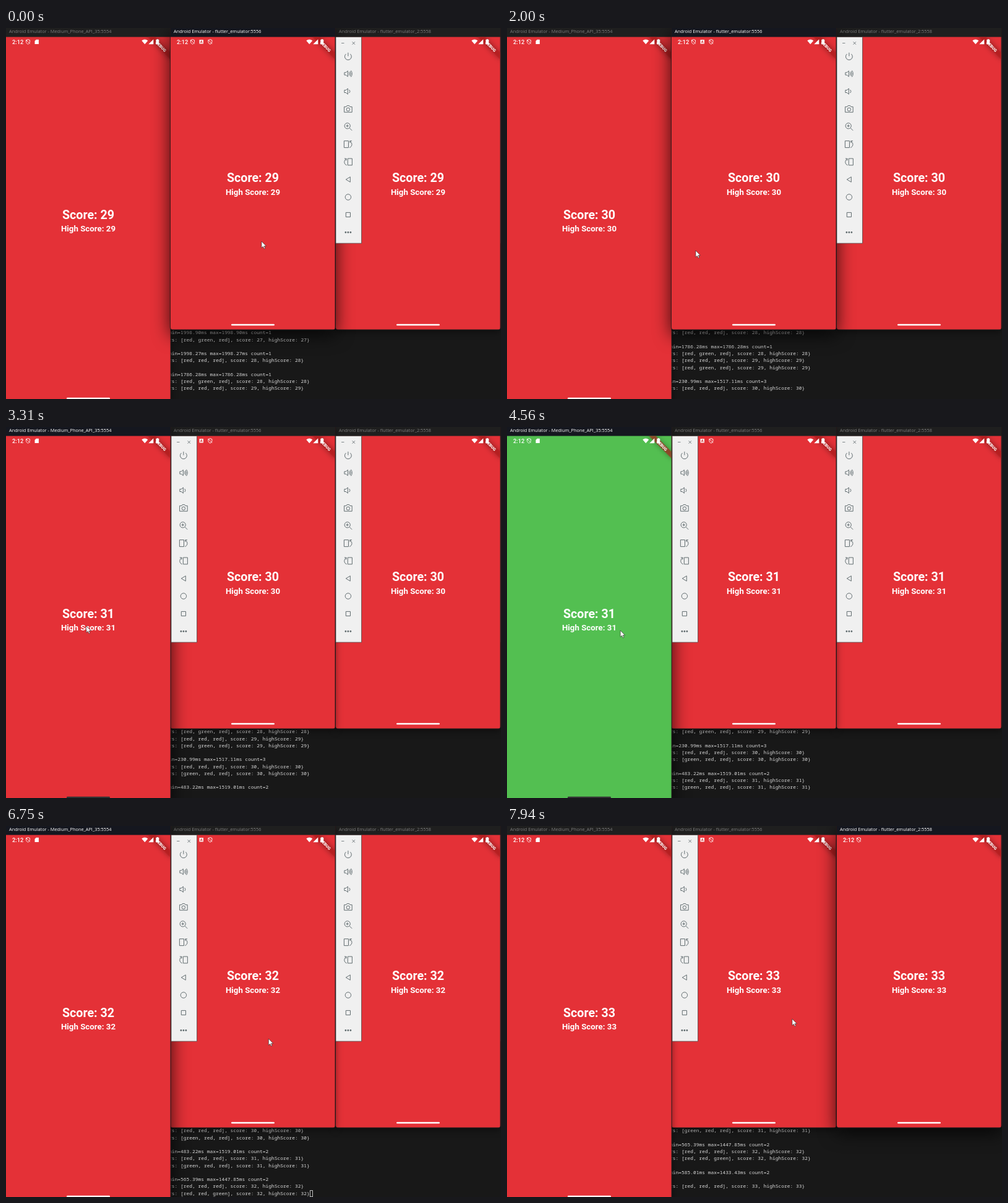
Write an HTML page that moves like this. It is 800 px wide and 600 px high and loops after 8000 ms.

```html
<!DOCTYPE html>
<html>
<head>
<meta charset="utf-8">
<style>
html, body { margin: 0; width: 100%; height: 100%; overflow: hidden; background: #181818; }
#stage { position: absolute; left: 0; top: 0; width: 800px; height: 600px; overflow: hidden; }
#log { position: absolute; left: 263px; top: 487.4px; margin: 0; color: #d8d8d8;
  font: 500 7.92px/11.23px "Noto Sans Mono", "DejaVu Sans Mono", monospace; }
#log i { display: inline-block; box-sizing: border-box; width: 5px; height: 11px; border: 1px solid #bbb; vertical-align: top; }
.win { position: absolute; top: 0; width: 266px; border-radius: 0 0 4px 4px; background: #1f1f1f;
  box-shadow: 0 0 0 .6px #2a1a1c, 0 3px 12px rgba(0,0,0,.5); }
.win.active { background: #15171f; box-shadow: 0 0 0 .6px #2a1a1c, 0 8px 28px 1px rgba(0,0,0,.75); }
.win svg { position: absolute; left: 0; top: 0; overflow: visible; }
.win .body { overflow: hidden; }
.title { font: 7.35px "Open Sans", "Noto Sans", sans-serif; fill: #7c7c7c; }
.active .title { fill: #fff; }
.score { font: bold 19.7px Roboto, sans-serif; text-anchor: middle; fill: #fff; }
.high { font: 600 13.3px Roboto, sans-serif; text-anchor: middle; fill: #fff; }
.clock { font: 500 9.3px Roboto, sans-serif; fill: #fff; }
.debug { font: 900 6.6px Roboto, sans-serif; text-anchor: middle; fill: #fff; }
.ribbon { filter: drop-shadow(0 0 4px rgba(0,0,0,.55)); }
.line { fill: none; stroke: #fff; stroke-width: .9; }
.tools { fill: none; stroke: #626d70; stroke-width: 1; stroke-linejoin: round; }
#mouse { position: absolute; left: 0; top: 0; z-index: 9; overflow: visible; }
</style>
</head>
<body>
<div id="stage">
  <pre id="log"></pre>
  <svg id="mouse" width="10" height="14"><path d="M0 0V10.5L2.5 8.3 4.1 12 5.8 11.3 4.2 7.7H7.5Z" fill="#fff" stroke="#222" stroke-width=".6"/></svg>
</div>
<script>
const LOOP = 8000, LAG = 150;
const RED = '#e43137', GREEN = '#53bf51';
const stage = document.getElementById('stage');
const log = document.getElementById('log');
const mouse = document.getElementById('mouse');

const at = (x, y, inner) => `<g transform="translate(${x} ${y})">${inner}</g>`;
const path = (d, extra = '') => `<path d="${d}" ${extra}/>`;

const shield = path('M0-3.7 3-2.6V0C3 2 1.6 3.1 0 3.8-1.6 3.1-3 2-3 0V-2.6ZM-3.2-3.2 3.2 3.2', 'class="line"');
const card = path('M-1-3.6H3.2V3.8H-3.2V-1.4Z', 'fill="#fff"');
const letterBox = path('M-3.2-3.2H3.2V3.2H-3.2Z', 'fill="#fff"') +
  path('M-1.6 2 0-2 1.6 2M-1 .8H1', 'fill="none" stroke="#c33" stroke-width=".9"');

// Toolbar icons, each centred on its own origin
const speaker = 'M-6-2H-3.6L-.5-4.6V4.6L-3.6 2H-6Z';
const rotate = 'M-6.5-5.4H.6V5.4H-6.5ZM-4.5-3V-2.9M-1.6-3V-2.9M2.2 5.4C7.2 4 7.2-2.6 3-4.9M6-5.4 2.7-5.2 3.3-2';
const tools = [
  [46, path('M-3.4-4A5.4 5.4 0 1 0 3.4-4M0-6.2V-.4')],
  [74, path(speaker + 'M1.6-2.4Q3 0 1.6 2.4M3.2-4Q5.6 0 3.2 4M4.6-5.2Q8.2 0 4.6 5.2')],
  [102.5, path(speaker + 'M1.8-2.6Q4.4 0 1.8 2.6')],
  [131, path('M-6.3-3.6H-3L-1.8-5.4H1.8L3-3.6H6.3V5.2H-6.3Z') + '<circle cy=".7" r="2.7"/>'],
  [159.5, '<circle cx="-1.2" cy="-1.2" r="4.6"/>' + path('M2.2 2.2 6.3 6.3M-3.4-1.2H1M-1.2-3.4V1')],
  [188, path(rotate)],
  [216.5, path(rotate, 'transform="scale(-1 1)"')],
  [245, path('M3.4-4.2V4.2L-3.6 0Z')],
  [273.5, '<circle r="4.7"/>'],
  [302, path('M-3.6-3.6H3.6V3.6H-3.6Z')],
  [330.5, [-4, 0, 4].map(x => `<circle cx="${x}" r="1.4" fill="#626d70" stroke="none"/>`).join('')]
];
const toolbar = `<g class="tools"><path d="M1 14.5H42.6V348.2H1Z" fill="#f0f0f0" stroke="#3a3a3a" stroke-width=".7"/>` +
  at(12.3, 24.5, path('M-2.2 0H2.2', 'stroke-width=".8"')) +
  at(29.8, 24.5, path('M-2.2-2.2 2.2 2.2M2.2-2.2-2.2 2.2', 'stroke-width=".9"')) +
  tools.map(([y, icon]) => at(20.9, y, icon)).join('') + '</g>';

function makeWindow(x, height, title, icons) {
  const el = document.createElement('div');
  const mid = (height - 488) / 2;
  el.className = 'win';
  el.style.cssText = `left:${x}px;height:${height}px`;
  el.innerHTML = `
    <svg class="body" width="266" height="${height}" style="border-radius:0 0 4px 4px">
      <rect class="bg" y="14.5" width="265.6" height="${height - 15}"/>
      <text class="title" x="5" y="7.6">${title}</text>
      <text class="score" x="133" y="${249 + mid}"></text>
      <text class="high" x="133" y="${269.5 + mid}"></text>
      <rect class="bar" x="98" y="${height - 9.2}" width="70" height="2.5" rx="1.2"/>
      <svg y="14.5" width="265.6" height="100" style="overflow:hidden">
        <g transform="translate(266 0) rotate(45)">
          <rect class="ribbon" x="-26" y="18.1" width="52" height="7.7" fill="#b71c1c" fill-opacity=".63"/>
          <text class="debug" y="24.3">DEBUG</text>
        </g>
      </svg>
      <text class="clock" x="10" y="25.7">2:12</text>
      ${icons.map((icon, i) => at(35.5 + i * 14.2, 22.3, icon)).join('')}
      <g fill="#fff">
        ${at(224.3, 22.3, path('M0 4-5-1.8C-2-4.6 2-4.6 5-1.8Z'))}
        ${at(234.3, 22.3, path('M-4 4H4V-4Z'))}
        ${at(244.8, 22.3, path('M-1-4.3H1V-3.6H2.5V4.2H-2.5V-3.6H-1Z'))}
      </g>
    </svg>
    <svg width="42" height="349" style="left:266px">${toolbar}</svg>`;
  stage.append(el);
  const find = s => el.querySelector(s);
  return { el, bg: find('.bg'), bar: find('.bar'), score: find('.score'), high: find('.high') };
}

const wins = [
  makeWindow(0, 607, 'Android Emulator - Medium_Phone_API_35:5554', [shield, card]),
  makeWindow(266, 488, 'Android Emulator - flutter_emulator:5556', [shield, letterBox, shield]),
  makeWindow(533, 488, 'Android Emulator - flutter_emulator_2:5558', [shield])
];

// Rounds: window index, time it turns green, time it is tapped
const rounds = [[1, 380, 1380], [0, 2620, 3200], [0, 4540, 5460], [2, 6800, 7350]];

const colours = { r: 'red', g: 'green' };
const state = (code, n) => `rs: [${[...code].map(c => colours[c]).join(', ')}], score: ${n}, highScore: ${n}}`;
const stat = (min, max, count) => `in=${min}ms max=${max}ms count=${count}`;
const events = [
  [0, 'm' + stat('1998.90', '1998.90', 1), state('rgr', 27), '', 'm' + stat('1998.27', '1998.27', 1),
    state('rrr', 28), '', 'm' + stat('1786.28', '1786.28', 1), state('rgr', 28), state('rrr', 29)],
  [300, state('rgr', 29)],
  [700, '', stat('230.99', '1517.11', 3)],
  [1400, state('rrr', 30)],
  [2560, state('grr', 30)],
  [3000, '', 'm' + stat('483.22', '1519.01', 2)],
  [3380, state('rrr', 31)],
  [4480, state('grr', 31)],
  [4850, '', 'm' + stat('565.39', '1447.85', 2)],
  [5480, state('rrr', 32)],
  [6720, state('rrg', 32)],
  [7100, '', 'm' + stat('585.01', '1433.43', 2)],
  [7430, '', state('rrr', 33)]
];

// Pointer: time, x, y
const track = [
  [0, 413, 345], [300, 408, 346], [1190, 337, 357], [2000, 305, 360], [2440, 290, 358], [2850, 170, 335],
  [3200, 130, 322], [3400, 130, 322], [4300, 170, 328], [5310, 221, 332], [5600, 250, 338], [5880, 320, 344],
  [6130, 345, 345], [6380, 385, 345], [6750, 424, 344], [7250, 590, 335], [7400, 590, 333], [7940, 461, 312], [8000, 455, 311]
];

function pointer(t) {
  const i = track.findIndex(p => p[0] > t);
  const [t0, x0, y0] = track[i - 1], [t1, x1, y1] = track[i];
  const k = (t - t0) / (t1 - t0);
  return [x0 + (x1 - x0) * k, y0 + (y1 - y0) * k];
}

function drawLog(t) {
  const rows = events.filter(e => e[0] <= t).flatMap(e => e.slice(1));
  const openLine = t >= 6720 && t < 6810;
  if (!openLine) rows.push('');
  const html = rows.slice(-10).join('\n') + (openLine ? '<i></i>' : '');
  if (log.dataset.html !== html) log.innerHTML = log.dataset.html = html;
}

function draw(now) {
  const t = now % LOOP;
  const active = t < 3200 ? 1 : t < 7350 ? 0 : 2;
  const order = [t < 3200 ? 2 : 4, 3, t < 7350 ? 1 : 5];
  wins.forEach((w, i) => {
    const lit = extra => rounds.some(([who, on, off]) => who === i && t >= on && t < off + extra);
    const score = 29 + rounds.filter(([who, , off]) => t >= off + (who === i ? 0 : LAG)).length;
    w.el.classList.toggle('active', i === active);
    w.el.style.zIndex = order[i];
    w.bg.setAttribute('fill', lit(0) ? GREEN : RED);
    w.bar.setAttribute('fill', lit(LAG) ? '#333' : '#fff');
    w.score.textContent = 'Score: ' + score;
    w.high.textContent = 'High Score: ' + score;
  });
  drawLog(t);
  const [x, y] = pointer(t);
  mouse.style.transform = `translate(${x}px, ${y}px)`;
  requestAnimationFrame(() => draw(performance.now() - start));
}
const start = performance.now();
draw(0);
</script>
</body>
</html>
```
